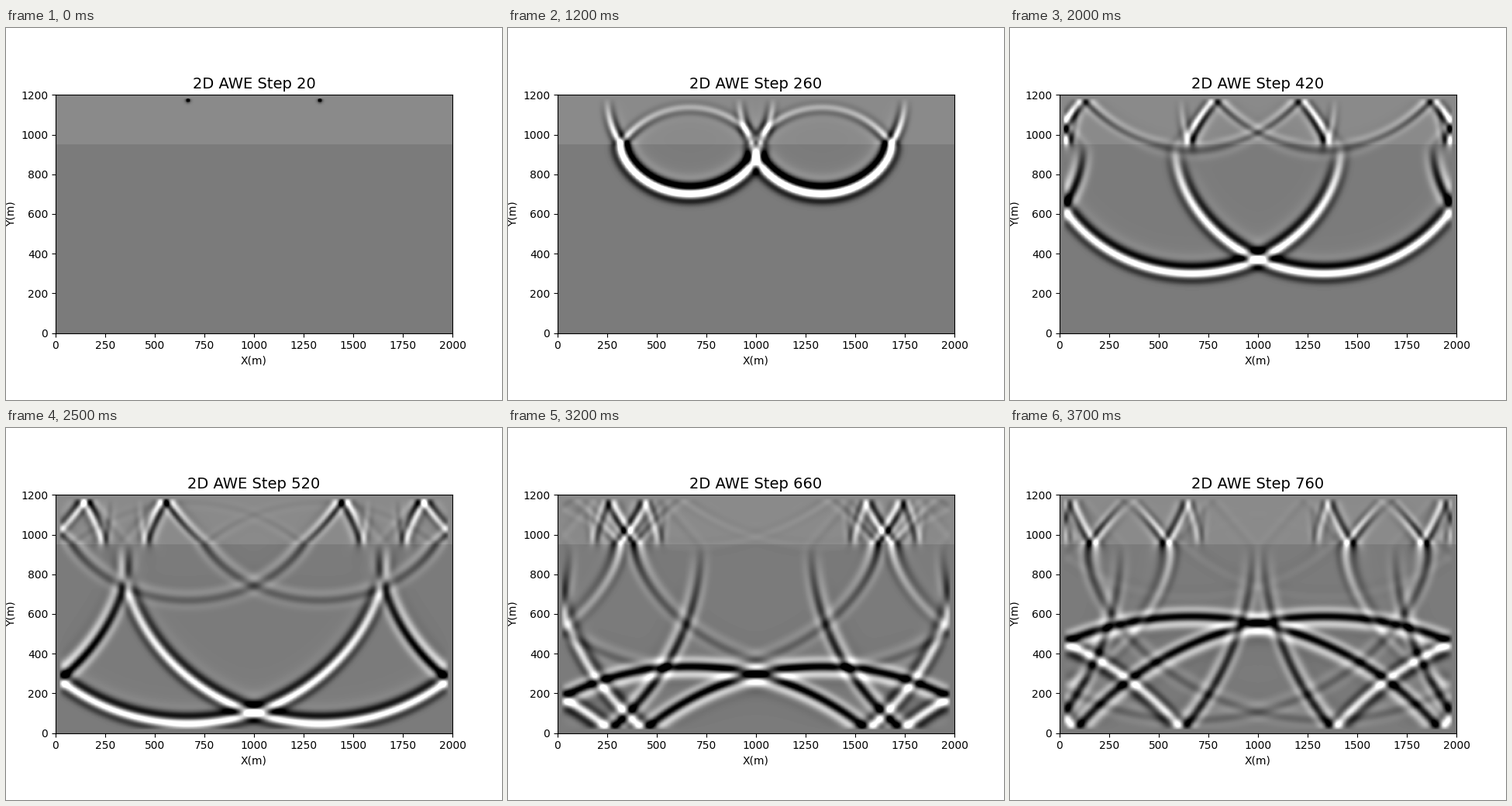
Animation, 640 px wide and 480 px high, one loop 3800 ms. Source, as a matplotlib script:

```python
import numpy as np
import matplotlib.pyplot as plt
from matplotlib.animation import FuncAnimation

# Grid: 5 m cells, 1 ms steps
DX, DT = 5.0, 0.001
NX, NY = 400, 240
FRAMES, STRIDE = 38, 20

# Two-layer model
INTERFACE = 50
V_TOP, V_BOTTOM = 1875.0, 2500.0
GRAY_TOP, GRAY_BOTTOM = 138 / 255, 123 / 255

# Ricker sources just below the surface
PEAK_FREQ, DELAY = 25.0, 0.042
SOURCE_ROW = 5
SOURCE_COLS = [NX // 3, 2 * NX // 3]

# Eighth-order second derivative; the outer cells stay at zero
COEFFS = [-205 / 72, 8 / 5, -1 / 5, 8 / 315, -1 / 560]
HALF = len(COEFFS) - 1


def ricker(t):
    a = (np.pi * PEAK_FREQ * (t - DELAY)) ** 2
    return (1 - 2 * a) * np.exp(-a)


def laplacian(p):
    rows, cols = slice(HALF, NY - HALF), slice(HALF, NX - HALF)
    total = 2 * COEFFS[0] * p[rows, cols]
    for k in range(1, HALF + 1):
        total += COEFFS[k] * (
            p[HALF - k:NY - HALF - k, cols] + p[HALF + k:NY - HALF + k, cols]
            + p[rows, HALF - k:NX - HALF - k] + p[rows, HALF + k:NX - HALF + k])
    return total


def simulate():
    velocity = np.full((NY, NX), V_BOTTOM)
    velocity[:INTERFACE] = V_TOP
    inner = (slice(HALF, NY - HALF), slice(HALF, NX - HALF))
    courant2 = (velocity[inner] * DT / DX) ** 2

    past, now = np.zeros((NY, NX)), np.zeros((NY, NX))
    snapshots = []
    for step in range(1, FRAMES * STRIDE + 1):
        future = np.zeros((NY, NX))
        future[inner] = (2 * now[inner] - past[inner]
                         + courant2 * laplacian(now))
        future[SOURCE_ROW, SOURCE_COLS] += ricker(step * DT)
        past, now = now, future
        if step % STRIDE == 0:
            snapshots.append(now)
    return np.array(snapshots)


waves = simulate()
# Scale so the main wavefront is just saturated near the bottom
waves *= 0.68 / waves[25][:, SOURCE_COLS[0]].max()

background = np.full((NY, NX), GRAY_BOTTOM)
background[:INTERFACE] = GRAY_TOP

fig = plt.figure(figsize=(6.4, 4.8), dpi=100)
ax = fig.add_axes([0.1, 0.1, 0.8, 0.8])
image = ax.imshow(background, cmap="gray", vmin=0, vmax=1,
                  extent=[0, NX * DX, 0, NY * DX])
ax.set_xlabel("X(m)")
ax.set_ylabel("Y(m)")
title = ax.set_title("", fontsize=14)


def update(frame):
    image.set_data(background + waves[frame])
    title.set_text(f"2D AWE Step {(frame + 1) * STRIDE}")
    return image, title


anim = FuncAnimation(fig, update, frames=FRAMES, interval=100,
                     repeat=True, repeat_delay=0)
plt.show()
```
